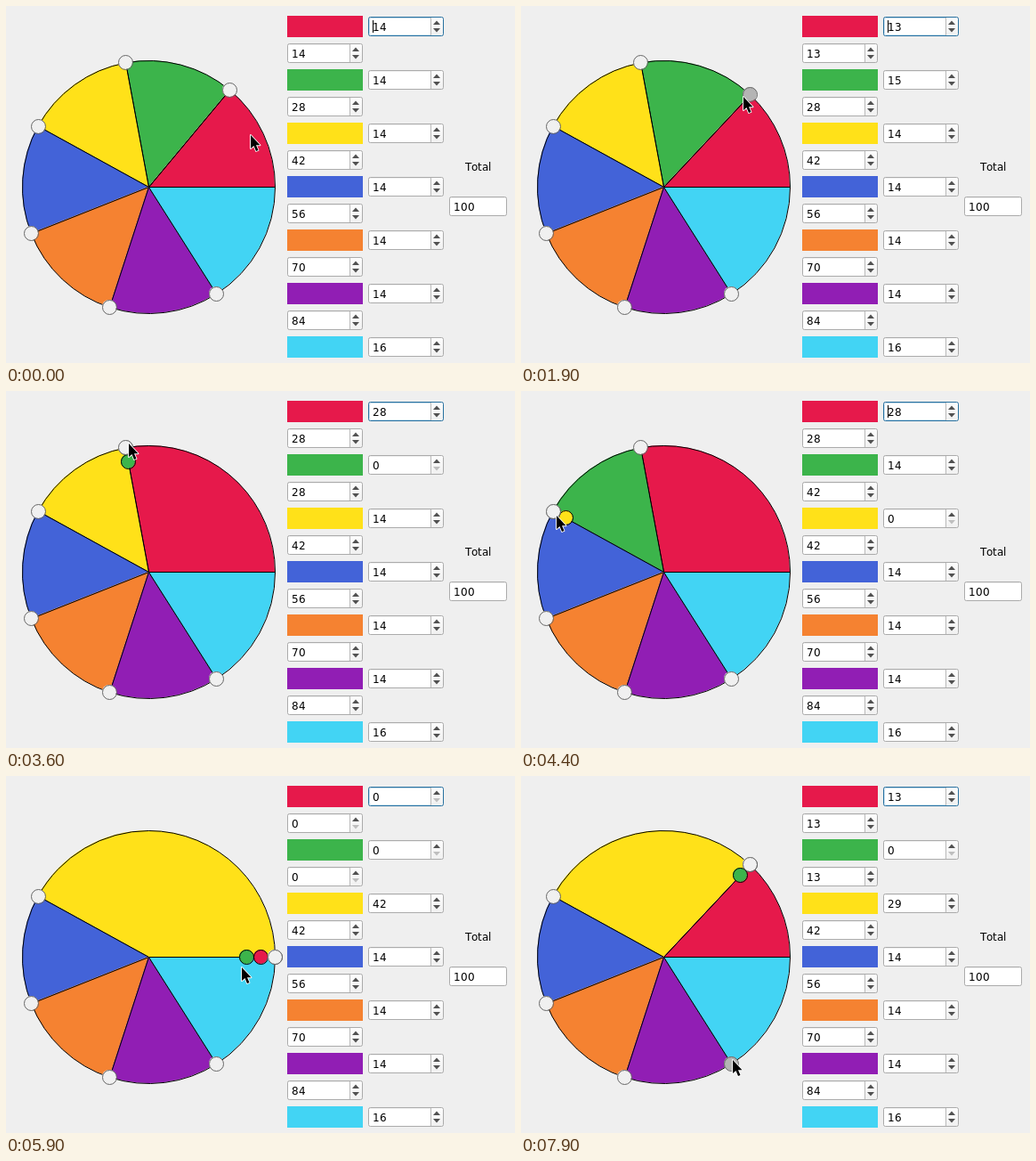
An HTML page with a canvas for the animation above (8000 ms loop, 572 px wide and 401 px high).

```html
<!DOCTYPE html>
<html lang="en">
<head>
<meta charset="utf-8">
<title>Pie editor</title>
<style>
html, body { margin: 0; width: 100%; height: 100%; overflow: hidden; background: #efefef; }
canvas { display: block; width: 572px; height: 401px; }
</style>
</head>
<body>
<canvas id="stage" width="572" height="401"></canvas>
<script>
const ctx = document.getElementById('stage').getContext('2d');
const LOOP = 8000, STEP = 100, TAU = 2 * Math.PI;
const CX = 160, CY = 203, R = 142, KNOB = 8;
const COLORS = ['#e6194b', '#3cb44b', '#ffe119', '#4363d8', '#f58231', '#911eb4', '#42d4f4'];
const START = [13.93, 27.92, 42, 56, 70, 84, 100];

// Where the pointer slows down or turns: time, percent of a turn, distance from the centre
const TURNS = [
  [0, 7.43, 129], [400, 21.9, 102], [900, 13.85, 141], [1100, 13.85, 141],
  [1400, 4.84, 127], [1500, 4.2, 128], [2400, 26.31, 146.5], [2500, 26.31, 146.5],
  [2600, 27.6, 146], [2800, 27.6, 146], [3100, 29, 148], [3600, 27.4, 146],
  [3700, 27.9, 143], [4300, 42.4, 136], [4500, 42.2, 136], [5000, 27.7, 143],
  [5200, 27.43, 105], [5400, 27.8, 125], [5900, -1.8, 106], [6400, -1.8, 106],
  [6900, 12.7, 125], [7300, -11.5, 103], [7700, -15.64, 140.6], [7800, -15.64, 140.6],
  [7900, -15.64, 139.8], [LOOP, -15.64, 139.8]
];

const clamp = (v, lo, hi) => Math.max(lo, Math.min(hi, v));
const ease = k => k * k * (3 - 2 * k);

function polar(pct, r) {
  const a = pct / 100 * TAU;
  return [CX + r * Math.cos(a), CY - r * Math.sin(a)].map(Math.round);
}

function pointerAt(t) {
  const i = TURNS.findIndex(p => p[0] > t);
  const a = TURNS[i - 1], b = TURNS[i], k = ease((t - a[0]) / (b[0] - a[0]));
  return [1, 2].map(n => a[n] + (b[n] - a[n]) * k);
}

function stateAt(t, pointerPct) {
  const pct = Math.round(pointerPct);
  const stops = [...START];
  let held = -1;
  if (t >= 1200) stops[0] = t < 2900 ? clamp(pct, 0, START[1]) : START[1];
  if (t >= 3700 && t <= 5000) stops[1] = clamp(pct, START[1], START[2]);
  // Dragging an empty slice moves both of its edges
  if (t >= 5400) stops[0] = stops[1] = t < 6900 ? clamp(pct, 0, START[2]) : 13;
  if (t >= 1000 && t < 2900) held = 0;
  else if (t >= 3700 && t <= 5000) held = 1;
  else if (t >= 7900) held = 5;
  return { stops, held };
}

// Fills sit on the pixel grid, hairlines on pixel centres
function outlined(trace, fill, stroke) {
  ctx.lineWidth = 1;
  ctx.lineJoin = 'bevel';
  ctx.beginPath();
  trace(0);
  ctx.fillStyle = fill;
  ctx.fill();
  ctx.beginPath();
  trace(0.5);
  ctx.strokeStyle = stroke;
  ctx.stroke();
}

function disc([x, y], fill, stroke) {
  outlined(o => ctx.arc(x + o, y + o, KNOB, 0, TAU), fill, stroke);
}

function slice(from, to, fill) {
  outlined(o => {
    ctx.moveTo(CX + o, CY + o);
    ctx.arc(CX + o, CY + o, R, -from / 100 * TAU, -to / 100 * TAU, true);
    ctx.closePath();
  }, fill, '#000');
}

function drawPie(stops, held) {
  const startOf = i => i ? stops[i - 1] : 0;
  stops.forEach((end, i) => {
    if (end > startOf(i)) slice(startOf(i), end, COLORS[i]);
  });

  // Empty slices stack inwards as coloured dots
  let depth = 0;
  stops.forEach((end, i) => {
    depth = end === startOf(i) ? depth + 1 : 0;
    if (depth) disc(polar(end, R - 2 * KNOB * depth), COLORS[i], '#000');
  });
  stops.slice(0, -1).forEach((s, i) => disc(polar(s, R), i === held ? '#b4b4b4' : '#f0f0f0', '#666'));
}

// Glyphs advance by whole pixels
function text(s, x, y) {
  ctx.font = '12px "DejaVu Sans", sans-serif';
  ctx.fillStyle = '#000';
  for (const ch of String(s)) {
    ctx.fillText(ch, x, y);
    x += Math.round(ctx.measureText(ch).width);
  }
}

function border(x, y, w, h, stroke) {
  ctx.lineWidth = 1;
  ctx.beginPath();
  ctx.roundRect(x + 0.5, y + 0.5, w - 1, h - 1, 2);
  ctx.strokeStyle = stroke;
  ctx.stroke();
}

function field(x, y, w, value) {
  ctx.fillStyle = '#fff';
  ctx.fillRect(x + 1, y + 1, w - 2, 20);
  ctx.fillStyle = 'rgba(0,0,0,.06)';
  ctx.fillRect(x + 1, y + 1, w - 2, 1);
  text(value, x + 5, y + 16);
}

function arrow(x, y, dir, enabled) {
  ctx.beginPath();
  ctx.moveTo(x - 4, y + 2 * dir);
  ctx.lineTo(x + 4, y + 2 * dir);
  ctx.lineTo(x, y - 2.5 * dir);
  ctx.fillStyle = enabled ? '#505050' : '#bebebe';
  ctx.fill();
}

function spinBox(x, y, value, focused) {
  field(x, y, 85, value);
  if (focused) border(x + 1, y + 1, 83, 20, 'rgba(48,140,198,.25)');
  const shade = ctx.createLinearGradient(0, y, 0, y + 22);
  shade.addColorStop(0, '#fdfdfd');
  shade.addColorStop(1, '#f0f0f0');
  ctx.fillStyle = shade;
  ctx.fillRect(x + 71, y + 1, 13, 20);
  ctx.fillStyle = '#b9b9b9';
  ctx.fillRect(x + 70, y + 1, 1, 20);
  arrow(x + 77, y + 7, 1, true);
  arrow(x + 77, y + 15, -1, value > 0);
  border(x, y, 85, 22, focused ? '#2771a0' : '#ababab');
}

function drawPanel(stops, caret) {
  const sums = stops.map(Math.round);
  sums.forEach((sum, i) => {
    const y = 11 + 60 * i;
    ctx.fillStyle = COLORS[i];
    ctx.fillRect(316, y, 85, 24);
    spinBox(407, y + 1, sum - (i ? sums[i - 1] : 0), i === 0);
    if (i < 6) spinBox(316, y + 31, sum, false);
  });
  if (caret) {
    ctx.fillStyle = '#000';
    ctx.fillRect(412, 16, 1, 14);
  }
  text('Total', 516, 185);
  field(498, 214, 65, 100);
  border(498, 214, 65, 22, '#ababab');
}

function drawPointer([x, y]) {
  const shape = [[0, 0], [0, 15], [3.5, 12], [6, 18], [8.5, 17], [6, 11.3], [10.5, 11.3]];
  ctx.beginPath();
  shape.forEach(([dx, dy]) => ctx.lineTo(x + dx, y + dy));
  ctx.closePath();
  ctx.lineJoin = 'round';
  ctx.lineWidth = 1.8;
  ctx.strokeStyle = '#fff';
  ctx.stroke();
  ctx.fillStyle = '#000';
  ctx.fill();
}

function draw(now) {
  const t = Math.floor(now % LOOP / STEP) * STEP;
  const [pct, dist] = pointerAt(t);
  const { stops, held } = stateAt(t, pct);
  const caret = Math.floor((t + 195) / 515) % 2 === 0;
  ctx.fillStyle = '#efefef';
  ctx.fillRect(0, 0, 572, 401);
  drawPie(stops, held);
  drawPanel(stops, caret);
  drawPointer(polar(pct, dist));
}

let begin;
function tick(now) {
  begin ??= now;
  draw(Math.max(0, now - begin));
  requestAnimationFrame(tick);
}
draw(0);
requestAnimationFrame(tick);
</script>
</body>
</html>
```
